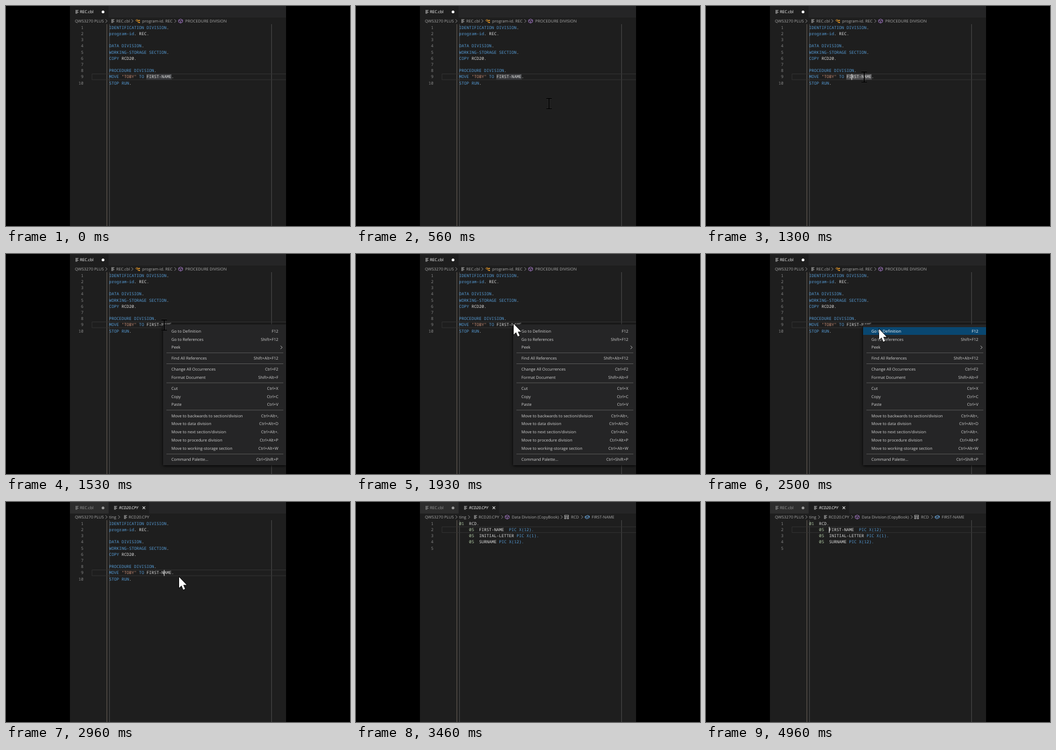
These frames come from a looping animation (624 px wide and 400 px high, 5.36 s). An HTML page with a canvas:

```html
<!DOCTYPE html>
<html lang="en">
<head>
<meta charset="utf-8">
<title>Go to Definition</title>
<style>
html, body { margin: 0; width: 100%; height: 100%; overflow: hidden; background: #000; }
canvas { display: block; }
</style>
</head>
<body>
<canvas id="stage" width="624" height="400"></canvas>
<script>
const ctx = document.getElementById('stage').getContext('2d');
const LOOP = 5360, LEFT = 116, RIGHT = 508;
const CODE_X = 187, CHAR = 4.53, PITCH = 11.2;
const MONO = '500 7.55px "Noto Sans Mono", "DejaVu Sans Mono", monospace';
const UI = '7.3px "Open Sans", "Noto Sans", sans-serif';
const INK = { b: '#569cd6', w: '#e0e0e0', s: '#ce9178', n: '#b5cea8' };

// Each token starts with its colour key.
const program = [
  'bIDENTIFICATION DIVISION|w.', 'bprogram-id|w. REC.', '',
  'bDATA DIVISION|w.', 'bWORKING-STORAGE SECTION|w.', 'bCOPY|w RCD20.', '',
  'bPROCEDURE DIVISION|w.', 'bMOVE |s"TOBY"|b TO|w FIRST-NAME.', 'bSTOP RUN|w.'
];
const copybook = [
  'n01|w  RCD.', 'n    05|w  FIRST-NAME|b  PIC X(12).',
  'n    05|w  INITIAL-LETTER|b PIC X(1).', 'n    05|w  SURNAME|b PIC X(12).', ''
];
const menu = [
  [140, 'Go to Definition', 'F12'], [155, 'Go to References', 'Shift+F12'], [169.5, 'Peek', ''],
  [189.5, 'Find All References', 'Shift+Alt+F12'],
  [209.5, 'Change All Occurrences', 'Ctrl+F2'], [224.5, 'Format Document', 'Shift+Alt+F'],
  [244.2, 'Cut', 'Ctrl+X'], [259, 'Copy', 'Ctrl+C'], [273.8, 'Paste', 'Ctrl+V'],
  [294, 'Move to backwards to section/division', 'Ctrl+Alt+,'],
  [308.8, 'Move to data division', 'Ctrl+Alt+D'],
  [323.8, 'Move to next section/division', 'Ctrl+Alt+.'],
  [338.6, 'Move to procedure division', 'Ctrl+Alt+P'],
  [353.6, 'Move to working-storage section', 'Ctrl+Alt+W'],
  [373.4, 'Command Palette...', 'Ctrl+Shift+P']
];

const clamp = v => Math.max(0, Math.min(1, v));
const ease = v => v * v * (3 - 2 * v);
const mix = (a, b, k) => a + (b - a) * k;

function rect(x, y, w, h, color) {
  ctx.fillStyle = color;
  ctx.fillRect(x, y, w, h);
}

function text(str, x, y, color, font = UI, align = 'left') {
  ctx.font = font;
  ctx.textAlign = align;
  ctx.fillStyle = color;
  ctx.fillText(str, x, y);
}

function line(points, color, width = 1, close = false) {
  ctx.beginPath();
  points.forEach(([x, y]) => ctx.lineTo(x, y));
  if (close) ctx.closePath();
  ctx.strokeStyle = color;
  ctx.lineWidth = width;
  ctx.stroke();
}

function dot(x, y, r, color) {
  ctx.beginPath();
  ctx.arc(x, y, r, 0, 7);
  ctx.fillStyle = color;
  ctx.fill();
}

const chevron = (x, y, color = '#a0a0a0') =>
  line([[x - 1.5, y - 3], [x + 1.5, y], [x - 1.5, y + 3]], color, 0.9);

function fileIcon(x, y, color) {
  [5.5, 4, 5.5, 3.5].forEach((w, i) => rect(x, y - 3 + i * 1.75, w, 0.9, color));
}

function cube(x, y, color) {
  line([[x, y - 3.6], [x + 3.6, y - 1.8], [x + 3.6, y + 1.9], [x, y + 3.7],
        [x - 3.6, y + 1.9], [x - 3.6, y - 1.8]], color, 0.9, true);
  line([[x - 3.6, y - 1.8], [x, y], [x + 3.6, y - 1.8]], color, 0.8);
  line([[x, y], [x, y + 3.7]], color, 0.8);
}

function field(x, y, color) {
  line([[x - 3.8, y - 0.8], [x + 0.8, y - 3], [x + 3.8, y - 1.4], [x + 3.8, y + 1],
        [x - 0.8, y + 3.2], [x - 3.8, y + 1.6]], color, 0.9, true);
  line([[x - 3.8, y - 0.8], [x - 0.8, y + 0.8], [x + 3.8, y - 1.4]], color, 0.8);
}

function classIcon(x, y) {
  const c = '#ee9d28';
  line([[x - 3.6, y - 1], [x - 1.4, y - 3.2], [x + 0.2, y - 1.6], [x - 2, y + 0.6]], c, 1, true);
  line([[x - 0.5, y - 1], [x + 3.5, y - 1]], c);
  line([[x + 0.4, y - 1], [x + 0.4, y + 2.6], [x + 3, y + 2.6]], c);
  dot(x + 3, y - 0.9, 1.1, c);
  dot(x + 3, y + 2.6, 1.1, c);
}

function structIcon(x, y) {
  ctx.strokeStyle = '#b8b8b8';
  ctx.lineWidth = 0.9;
  ctx.strokeRect(x - 3.6, y - 3.2, 7.2, 2.4);
  ctx.strokeRect(x - 3.6, y + 0.8, 2.4, 2.4);
  ctx.strokeRect(x + 1.2, y + 0.8, 2.4, 2.4);
}

function tabs(second) {
  rect(LEFT, 0, RIGHT - LEFT, 21, '#252526');
  rect(LEFT, 0, 70, 21, second ? '#2d2d2d' : '#1e1e1e');
  const color = second ? '#9a9a9a' : '#fff';
  fileIcon(126, 10.5, second ? '#9a9a9a' : '#c8c8c8');
  text('REC.cbl', 134, 13, color);
  dot(176, 10.7, 2.5, color);
  if (!second) return;
  rect(186.5, 0, 73, 21, '#1e1e1e');
  fileIcon(196, 10.5, '#c8c8c8');
  text('RCD20.CPY', 205, 13, '#fff', 'italic ' + UI);
  line([[247.8, 8.2], [252.4, 12.8]], '#e8e8e8', 1.1);
  line([[252.4, 8.2], [247.8, 12.8]], '#e8e8e8', 1.1);
}

function crumbs(second, loaded) {
  const y = 27.3, label = (s, x) => text(s, x, 29.8, '#a9a9a9');
  label('QWS3270 PLUS', 125);
  chevron(182, y);
  if (!second) {
    fileIcon(191, y, '#c0c0c0');
    label('REC.cbl', 200);
    chevron(229, y);
    classIcon(239, y);
    label('program-id. REC', 247);
    chevron(307, y);
    cube(316.7, y, '#b180d7');
    label('PROCEDURE DIVISION', 325);
    return;
  }
  label('ting', 187);
  chevron(205, y);
  fileIcon(214, y, '#c0c0c0');
  label('RCD20.CPY', 222.5);
  if (!loaded) return;
  chevron(265, y);
  cube(274.3, y, '#b180d7');
  label('Data Division (CopyBook)', 282.5);
  chevron(373, y);
  structIcon(382, y);
  label('RCD', 390);
  chevron(410, y);
  field(419.5, y, '#75beff');
  label('FIRST-NAME', 427.5);
}

function code(lines, current, wordColor, caretX) {
  const top = 34 + (current - 1) * PITCH;
  rect(182.4, 33, 1.2, 367, '#625a54');
  rect(187, 33, 1.3, 367, '#444');
  rect(481, 33, 1.3, 367, '#444');
  line([[RIGHT, top - 0.1], [156, top - 0.1], [156, top + 10.4], [RIGHT, top + 10.4]], '#323232');
  if (wordColor) rect(254.5, top, 46, 10.5, wordColor);
  lines.forEach((src, i) => {
    const y = 41.8 + i * PITCH;
    text(i + 1, 140.5, y, '#858585', MONO, 'right');
    let x = CODE_X;
    for (const token of src ? src.split('|') : []) {
      text(token.slice(1), x, y, INK[token[0]], MONO);
      x += (token.length - 1) * CHAR;
    }
  });
  if (caretX) rect(caretX - 0.5, top, 1.2, 10.8, '#d8d8d8');
}

function contextMenu(hover) {
  ctx.save();
  ctx.shadowColor = '#000';
  ctx.shadowBlur = 5;
  ctx.shadowOffsetY = 1;
  rect(285, 128, 223, 256, '#252526');
  ctx.restore();
  if (hover) rect(285, 133, 223, 14, '#094771');
  menu.forEach(([y, name, keys], i) => {
    const color = hover && !i ? '#fff' : '#d0d0d0';
    text(name, 300, y + 2.6, color);
    text(keys, 494, y + 2.6, color, UI, 'right');
  });
  chevron(499.5, 169.8, '#ccc');
  [179.7, 199.5, 234.2, 283.8, 363.7].forEach(y => rect(291, y - 0.5, 212, 1, '#585858'));
}

function beam(x, y) {
  for (const [color, w] of [['#55555566', 3], ['#000', 1.8]]) {
    line([[x, y - 9], [x, y + 9.5]], color, w);
    line([[x - 5, y - 9], [x + 5, y - 9]], color, w);
    line([[x - 5, y + 9.5], [x + 5, y + 9.5]], color, w);
  }
}

function arrow(x, y) {
  const shape = [[0, 0], [0, 19.5], [4.4, 15.4], [7.6, 23], [10.8, 21.6], [7.6, 14.2], [13.6, 14.2]]
    .map(([a, b]) => [x + a, y + b]);
  line(shape, '#000', 1.4, true);
  ctx.fillStyle = '#fff';
  ctx.fill();
}

function draw(t) {
  const second = t >= 2960, loaded = t >= 3000;
  const open = clamp((t - 1320) / 200);
  rect(0, 0, 624, 400, '#000');
  ctx.save();
  ctx.beginPath();
  ctx.rect(LEFT, 0, RIGHT - LEFT, 400);
  ctx.clip();
  rect(LEFT, 0, RIGHT - LEFT, 400, '#1e1e1e');
  tabs(second);
  crumbs(second, loaded);

  if (loaded) {
    const caret = t < 3460 || (t >= 4030 && t < 4500) || t >= 4960;
    code(copybook, 2, null, caret && 223.4);
  } else {
    const word = t < 1300 ? '#37383b' : t < 1400 ? '#4b4b4d' : null;
    const caret = second ? 286.9 : t >= 1300 && t < 1400 && 264.3;
    code(program, 9, word, caret);
  }

  const slide = ease(clamp((t - 1930) / 500));
  const tip = [mix(286, 314, slide), mix(127, 136.5, slide)];
  if (open && !second) {
    ctx.globalAlpha = open;
    contextMenu(tip[1] > 133);
    ctx.globalAlpha = 1;
  }

  if (t >= 260 && t < 1930) {
    const k = ease(clamp((t - 260) / 500));
    beam(mix(468, 287, k), mix(267, 129, k));
  } else if (t >= 1930 && t < 3200) {
    arrow(...tip);
  }
  ctx.restore();
}

ctx.textRendering = 'geometricPrecision';
const start = performance.now();
function tick() {
  draw((performance.now() - start) % LOOP);
  requestAnimationFrame(tick);
}
tick();
</script>
</body>
</html>
```
